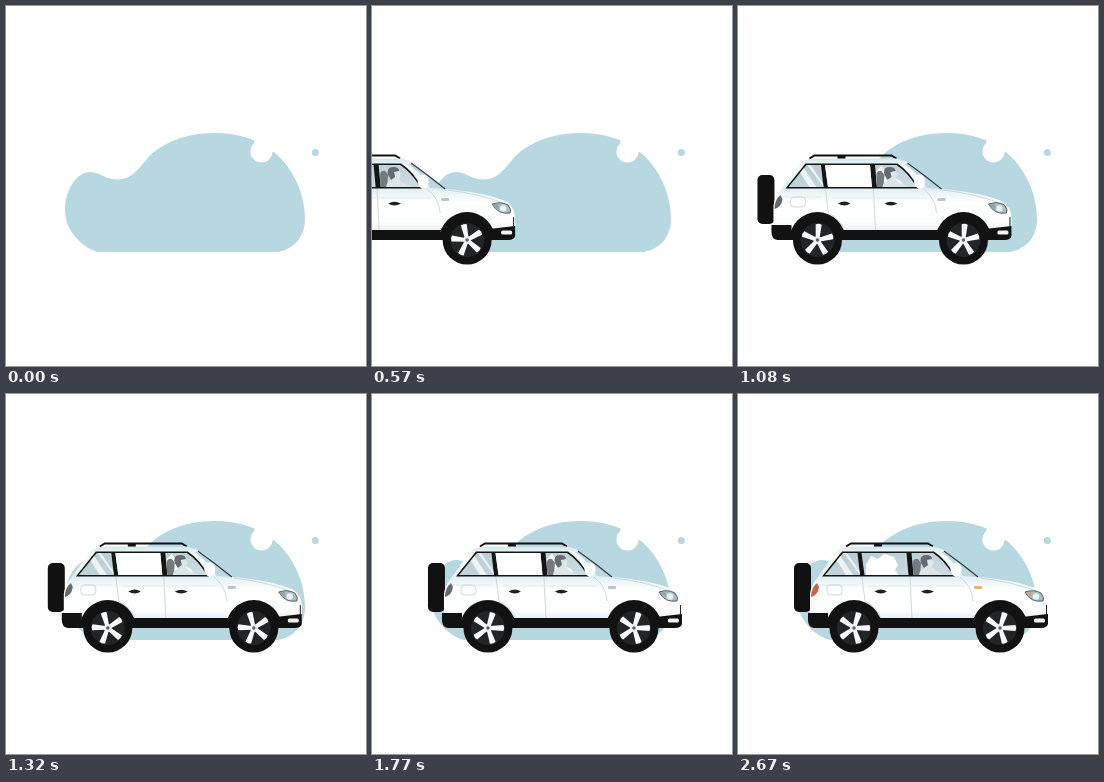
Recreate the animation shown at these times as an HTML page. Size 360 by 360 pixels, loop 2.7 s.

```html
<!DOCTYPE html>
<html>
<head>
<meta charset="utf-8">
<style>
html, body { margin: 0; width: 100%; height: 100%; overflow: hidden; background: #fff; }
svg { display: block; width: 100vw; height: 100vh; }
</style>
</head>
<body>
<svg viewBox="0 0 360 360">
  <defs>
    <linearGradient id="paint" x2="0" y2="1">
      <stop offset="0" stop-color="#d3e6ec"/>
      <stop offset=".12" stop-color="#fafdfe"/>
      <stop offset=".4" stop-color="#e2eff4"/>
      <stop offset=".58" stop-color="#fff"/>
      <stop offset=".85" stop-color="#fcfdfe"/>
      <stop offset="1" stop-color="#dfe6ea"/>
    </linearGradient>
    <linearGradient id="glass" x2="1" y2="1">
      <stop offset="0" stop-color="#b4c9cf"/>
      <stop offset="1" stop-color="#cfdfe4"/>
    </linearGradient>
    <clipPath id="panes">
      <path d="M87 181L105 159H119.500L122 181ZM123.500 159H168.500L170.500 181H126.500ZM173.500 159H195Q206 166 215 181H175.500Z"/>
    </clipPath>
    <g id="wheel">
      <circle r="24.500" fill="#121212"/>
      <circle r="17" fill="#222426"/>
      <g id="spokes" fill="#f7f8f9"></g>
      <circle r="3.800" fill="#eef0f1"/>
      <circle r="1.700" fill="#5d6164"/>
    </g>
  </defs>

  <g fill="#b7d7e1">
    <path d="M92 246C74 241 59 223 59 204C59 185 70 166 84 166C94 166 99 173.500 112 173.500C124 173.500 131 165 140 154C153 138 179 127 208 127C234 127 254 134 269 147C288 163 299 189 299 213C299 231 288 243 272 246Z"/>
    <circle cx="309.300" cy="146.500" r="3.500"/>
  </g>
  <circle cx="255.500" cy="145.500" r="11" fill="#fff"/>
  <path d="M249 132L248 138L262 150L268 145Z" fill="#fff"/>

  <g id="car">
    <rect x="56" y="169" width="17" height="49" rx="5" fill="#111"/>
    <path d="M108 152.500L113 149.500H190L195 152.500" fill="none" stroke="#111" stroke-width="2"/>
    <path d="M136 149H144V153H136Z" fill="#111"/>
    <path d="M72 228V200Q73 191 80 183L97 159Q103 152.500 114 152.500H190Q201 152 209 158L240 183Q280 186 302 196Q310 202 310 212V228Z" fill="url(#paint)"/>
    <path d="M207 158Q224 169 239 183L225 182Q218 169 203 158Z" fill="#bcd8e1"/>
    <path d="M206 157Q224 170 240 183" fill="none" stroke="#34393c" stroke-width="1.200"/>

    <path d="M84 182.500L104 157.500H196Q209 166 217 182.500Z" fill="#151515"/>
    <g clip-path="url(#panes)">
      <path d="M84 157H220V183H84Z" fill="url(#glass)"/>
      <path d="M97 164L101 160L115 181H108ZM106 159H109L122 178V181Z" fill="#eef4f6"/>
      <path id="streaks" d="M129 159H136L151 181H144ZM140 159H143L158 181H155Z" fill="#e9f0f2"/>
      <path id="blank" d="M122 158H171V183H122ZM175 183V165L180 160L187 169L199 175L204 183Z" fill="#fff"/>
      <path id="haze" d="M128 182V171L133 162L140 165L146 160L156 163L160 171L157 176L161 182Z" fill="#fff"/>
      <path d="M175 182V168Q176 164 180 165L183 169L182 182Z" fill="#747b7f"/>
      <path d="M181 182Q181 176 187 174L186 167Q187 161 193 164L196 168L194 173L198 177L207 181Z" fill="#dce5e8"/>
      <path d="M183 169Q181 161 188 161Q194 161 194 165L189 166L190 171L186 174Z" fill="#656b70"/>
    </g>
    <ellipse cx="218" cy="175.500" rx="5.500" ry="7" fill="#fff"/>

    <g fill="none" stroke="#c3d0d5" stroke-width=".8">
      <path d="M124 183L127 207Q139 213 143 224M172 183L174 224M222 183Q234 192 235 207"/>
      <path d="M76 191H120M130 192H226" stroke="#dde9ee"/>
      <rect x="89" y="191" width="15" height="10" rx="3.500"/>
      <path d="M242 184Q275 188 298 197"/>
    </g>
    <path d="M136.500 197.500Q143 193.500 149 197.500Q143 201.500 136.500 197.500ZM183 197.500Q189 194 196 197.500Q189 201.500 183 197.500Z" fill="#222"/>
    <path id="tail" d="M73 203Q73 194 79 189L81 193Q80 201 73 203Z"/>
    <rect id="signal" x="236" y="192" width="8" height="3" rx="1"/>
    <path d="M287 198Q296 195 303 199Q307 204 305 207Q293 209 287 198Z" fill="#a9bdc3" stroke="#4d5659" stroke-width=".9"/>
    <circle cx="298" cy="202.500" r="3.200" fill="#e7f2f4"/>
    <path id="lamp" d="M288 198.500L293 198L294 203Q290 202 288 198.500Z"/>
    <path d="M308.500 211V220" stroke="#222"/>

    <path d="M70 219H90V234H76Q70 233 70 226ZM138 224H242V234H138ZM284 223L310 220V230Q309 234 303 234H284Z" fill="#121212"/>
    <path d="M88 234A28 28 0 0 1 144 234ZM234 234A28 28 0 0 1 290 234Z" fill="#121212"/>
    <rect x="296" y="224.500" width="11" height="4" rx="1.500" fill="#f4f4f4"/>
    <use href="#wheel" x="116" y="234"/>
    <use href="#wheel" x="262" y="234"/>
  </g>
</svg>
<script>
const LOOP = 2700, ARRIVAL = 1800, DISTANCE = 490, RADIUS = 24.5;
const el = id => document.getElementById(id);
const show = (id, on) => el(id).setAttribute('opacity', on ? 1 : 0);
const fill = (id, color) => el(id).setAttribute('fill', color);

el('spokes').innerHTML = [0, 1, 2, 3, 4].map(i =>
  `<path d="M-1.900 -2L-3 -15.500Q0 -17 3 -15.500L1.900 -2Z" transform="rotate(${i * 72 + 18})"/>`
).join('');

// Cubic bezier (.33, 0, 0, 1), solved by bisection.
function ease(x) {
  let low = 0, high = 1;
  for (let i = 0; i < 30; i++) {
    const s = (low + high) / 2;
    if (3 * s * (1 - s) ** 2 * .33 + s ** 3 < x) low = s;
    else high = s;
  }
  return low * low * (3 - 2 * low);
}

function draw(t) {
  const offset = DISTANCE * (ease(Math.min(1, t / ARRIVAL)) - 1);
  el('car').setAttribute('transform', `translate(${offset})`);
  el('spokes').setAttribute('transform', `rotate(${offset / RADIUS * 180 / Math.PI})`);

  // Glass reflections and lamp tints switch as the car passes the cloud.
  const bright = t > 1000 && t < 1850;
  const warm = !bright && t > 700;
  show('streaks', t <= 1000);
  show('blank', bright);
  show('haze', t >= 1850);
  fill('signal', warm ? '#e5b27c' : '#bcc5c9');
  fill('lamp', warm ? '#d9a184' : '#8fa2a8');
  fill('tail', warm ? '#c9644c' : '#646a6d');
}

function tick() {
  draw(performance.now() % LOOP);
  requestAnimationFrame(tick);
}
tick();
</script>
</body>
</html>
```
